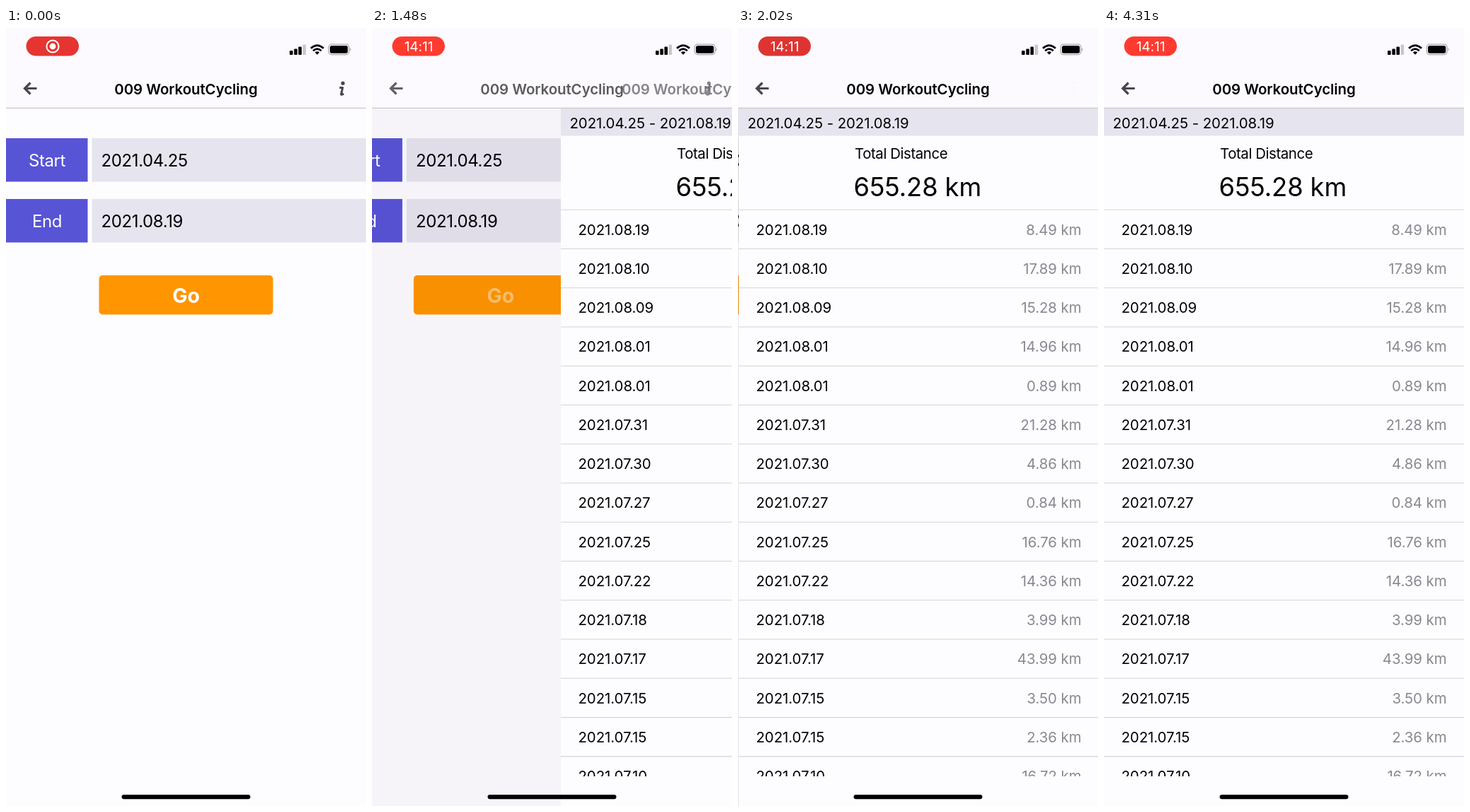
Animation, 509 px wide and 1101 px high, one loop 4.41 s. Source, as an HTML page:

```html
<!DOCTYPE html>
<html lang="en">
<head>
<meta charset="utf-8">
<title>Workout cycling</title>
<style>
  html, body { margin: 0; width: 100%; height: 100%; overflow: hidden; background: #fdfcff; }
  svg { display: block; width: 509px; height: 1101px; }
  text {
    font-family: Inter, Roboto, sans-serif; font-size: 20.4px;
    letter-spacing: -.003em; font-optical-sizing: none;
  }
  .page { fill: #fdfcff; }
  .field { fill: #e6e4ee; }
  .label { fill: #5854d6; }
  .large { font-size: 24px; letter-spacing: -.016em; }
  .light { fill: #fff; }
  .title { font-weight: 600; }
  .caption { letter-spacing: -.02em; }
  .total { font-size: 36.3px; }
  .grey { fill: #8a8891; }
  .rule { stroke: #d5d3d8; stroke-width: 1.1; }
  .icon { fill: #49454f; stroke: #49454f; stroke-width: 0; }
</style>
</head>
<body>
<svg viewBox="0 0 509 1101">
  <defs><clipPath id="listClip"><rect y="114" width="509" height="945"/></clipPath></defs>
  <rect class="page" width="509" height="1101"/>

  <g id="form">
    <rect class="page" y="114" width="509" height="987"/>
    <rect class="label" y="156" width="115.5" height="61.5"/>
    <rect class="label" y="242" width="115.5" height="61.5"/>
    <rect class="field" x="121.5" y="156" width="388" height="61.5"/>
    <rect class="field" x="121.5" y="242" width="388" height="61.5"/>
    <g class="light" text-anchor="middle">
      <text class="large" x="58" y="195.5">Start</text>
      <text class="large" x="58" y="281.5">End</text>
    </g>
    <text class="large" x="134.5" y="195.5">2021.04.25</text>
    <text class="large" x="134.5" y="281.5">2021.08.19</text>
    <rect x="131.5" y="350" width="246" height="55.5" rx="5" fill="#ff9500"/>
    <text id="go" class="light" x="254.5" y="388.5" text-anchor="middle"
      style="font-size:28.5px;font-weight:700">Go</text>
  </g>
  <rect id="dim" y="114" width="509" height="987" fill="#200040"/>

  <g id="results">
    <rect class="page" y="114" width="509" height="987"/>
    <rect class="field" y="114" width="509" height="38.5"/>
    <text x="12.5" y="142">2021.04.25 - 2021.08.19</text>
    <text class="caption" x="164" y="184.5">Total Distance</text>
    <text class="total" x="162.5" y="237.5">655.28 km</text>
    <g id="list" clip-path="url(#listClip)"></g>
  </g>

  <rect width="509" height="113" fill="#fcfaff"/>
  <path d="M0 113.4H509" stroke="#c9c7cc" stroke-width="1.2"/>
  <text id="oldTitle" class="title" x="254.5" y="93.5" text-anchor="middle">009 WorkoutCycling</text>
  <g id="newTitle"><text class="title" x="254.5" y="93.5" text-anchor="middle">009 WorkoutCycling</text></g>
  <path id="back" class="icon" d="M43.5 85.5H27M34.5 77.5L26.5 85.5L34.5 93.5"
    style="fill:none;stroke-width:3.2"/>
  <g id="info" class="icon">
    <circle cx="476.3" cy="78.2" r="2.6"/>
    <path d="M471.5 84.5H476L473.8 93.8Q473.7 95 477.5 93" fill="none" style="stroke-width:3;stroke-linejoin:round"/>
  </g>

  <rect id="pill" x="28.5" y="12" width="74.5" height="27.5" rx="13.75"/>
  <g id="recordIcon">
    <circle cx="66" cy="26" r="8.6" fill="none" stroke="#fff" stroke-width="2"/>
    <circle cx="66" cy="26" r="4.4" fill="#fff"/>
  </g>
  <text id="clock" class="light" x="66" y="32.8" text-anchor="middle" style="font-size:19px">14:11</text>

  <rect x="401" y="32" width="4.6" height="6" rx="1"/>
  <rect x="407.3" y="29.5" width="4.6" height="8.5" rx="1"/>
  <rect x="413.4" y="26.5" width="4.6" height="11.5" rx="1"/>
  <rect x="419.5" y="23.5" width="4.6" height="14.5" rx="1" fill="#c9c7cc"/>
  <g fill="none" stroke="#000" stroke-width="2.8">
    <path d="M431 28.8Q440 20.5 449 28.8"/>
    <path d="M434.2 32.2Q440 27 445.8 32.2"/>
  </g>
  <path d="M436.8 34.5Q440 31.8 443.2 34.5L440 37.8Z"/>
  <rect x="456.2" y="23.2" width="28.8" height="14.4" rx="4" fill="none" stroke="#a5a3a9" stroke-width="1.2"/>
  <rect x="458" y="25" width="25.2" height="10.8" rx="2.5"/>
  <path d="M486.4 28Q489 30.4 486.4 32.8Z" fill="#a5a3a9"/>
  <rect x="163.5" y="1085" width="182" height="6.2" rx="3.1"/>
</svg>
<script>
const LOOP = 4410, WIDTH = 509, ROW = 55.26;
const el = id => document.getElementById(id);

const rides = `08.19 8.49|08.10 17.89|08.09 15.28|08.01 14.96|08.01 0.89|07.31 21.28|07.30 4.86|07.27 0.84
|07.25 16.76|07.22 14.36|07.18 3.99|07.17 43.99|07.15 3.50|07.15 2.36|07.10 16.72`.split('|');
el('list').innerHTML = rides.map((ride, i) => {
  const [day, km] = ride.trim().split(' '), y = i * ROW;
  return `<path class="rule" d="M0 ${257.2 + y}H509"/>
    <text x="24.5" y="${292.6 + y}">2021.${day}</text>
    <text class="grey" x="484.5" y="${292.6 + y}" text-anchor="end">${km} km</text>`;
}).join('');

// Linear interpolation through [time, value] points.
function track(points, t) {
  const i = points.findIndex(p => p[0] > t);
  if (i < 0) return points[points.length - 1][1];
  if (i === 0) return points[0][1];
  const [t0, a] = points[i - 1], [t1, b] = points[i];
  return a + (b - a) * (t - t0) / (t1 - t0);
}

// Critically damped spring driving the page push.
function push(t) {
  const u = Math.max(0, t - 1368) * 0.01417;
  return 1 - (1 + u) * Math.exp(-u);
}

const PULSE = [[0, .7], [600, 0], [1480, 0], [1780, .62], [2100, 1], [2340, .95], [3100, 0]];
const mix = (a, b, k) => a + (b - a) * k;
const shift = (id, x) => el(id).setAttribute('transform', `translate(${x} 0)`);
const fade = (id, alpha) => el(id).setAttribute('opacity', alpha);

function draw(t) {
  const p = push(t), rest = 1 - p;
  shift('form', -0.3 * WIDTH * p);
  shift('results', Math.round(WIDTH * rest));
  shift('newTitle', 545 * rest ** 1.556);
  fade('dim', 0.1 * p ** 1.5);
  fade('oldTitle', rest ** 0.7);
  fade('newTitle', p);
  fade('info', rest ** 0.7);
  fade('back', 1 - 0.15 * Math.sin(Math.PI * p));
  fade('go', t < 1000 ? 1 : track([[1140, .25], [1480, .42]], t));

  const k = track(PULSE, t);
  el('pill').setAttribute('fill', `rgb(${mix(255, 219, k)},${mix(59, 51, k)},${mix(48, 49, k)})`);
  const clock = track([[300, 0], [500, 1]], t);
  fade('clock', clock);
  fade('recordIcon', 1 - clock);
}

const start = performance.now();
function tick() {
  draw((performance.now() - start) % LOOP);
  requestAnimationFrame(tick);
}
tick();
</script>
</body>
</html>
```
